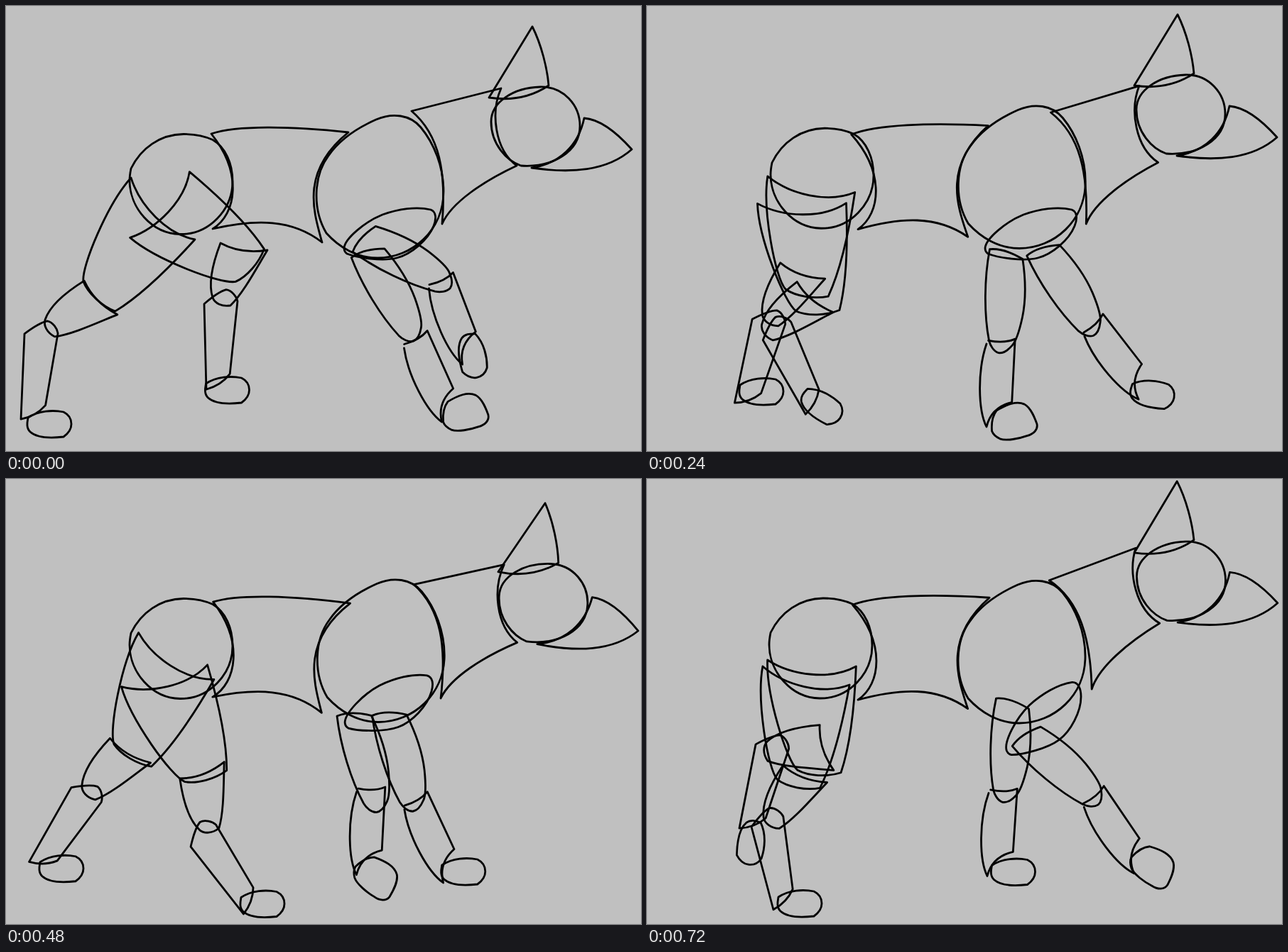
Write an HTML page that moves like this. It is 894 px wide and 627 px high and loops after 0.8 s.

```html
<!DOCTYPE html>
<html lang="en">
<head>
<meta charset="utf-8">
<title>Walk cycle</title>
<style>
  html, body { margin: 0; width: 100%; height: 100%; overflow: hidden; background: #c0c0c0; }
  svg { display: block; width: 894px; height: 627px; }
  path { fill: none; stroke: #000; stroke-width: 2.8; stroke-linejoin: round; stroke-linecap: round; }
</style>
</head>
<body>
<svg id="stage" viewBox="0 0 894 627"></svg>
<script>
const STEP = 80, COUNT = 10;
const KEYS = [0, 2, 4, 5, 7, 8, 9];
const HEAD_KEYS = [0, 2, 3, 4, 5, 6, 7, 8, 9];
const stage = document.getElementById('stage');
const parts = [];

// "x y [deg]" is a plain placement, "x y u v" a bone between two points.
function pose(text) {
  const [x, y, u = 0, v] = text.trim().split(' ').map(Number);
  if (v === undefined) return { x, y, a: u };
  return { x: (x + u) / 2, y: (y + v) / 2, a: Math.atan2(v - y, u - x) * 180 / Math.PI };
}

function mix(p, q, k) {
  const turn = ((q.a - p.a + 540) % 360 + 360) % 360 - 180;
  return { x: p.x + (q.x - p.x) * k, y: p.y + (q.y - p.y) * k, a: p.a + turn * k };
}

function poseAt(poses, keys, step) {
  let i = keys.length - 1;
  while (keys[i] > step) i--;
  const next = i + 1 < keys.length ? keys[i + 1] : COUNT;
  return mix(poses[i], poses[(i + 1) % poses.length], (step - keys[i]) / (next - keys[i]));
}

function part(shape, rest, track, keys = KEYS) {
  const el = document.createElementNS('http://www.w3.org/2000/svg', 'path');
  el.setAttribute('d', shape);
  stage.append(el);
  const r = pose(rest), poses = track.split(',').map(pose);
  const moves = Array.from({ length: COUNT }, (_, step) => {
    const p = poseAt(poses, keys, step);
    return `translate(${p.x} ${p.y}) rotate(${p.a - r.a}) translate(${-r.x} ${-r.y})`;
  });
  parts.push({ el, moves });
}

const limb = (shape, rest) => track => part(shape, rest, track);

const thigh = limb('M164 277C200 296 255 298 289 275C292 335 291 385 281 426C262 434 236 435 220 428C203 416 166 325 164 277Z', '164 277 289 275');
const shin = limb('M302 334C320 344 343 348 368 344C354 367 334 405 316 422C304 424 294 419 291 411C284 390 292 360 302 334Z', '302 334 368 344');
const hock = limb('M104 452C112 443 122 432 132 428C140 428 148 436 150 442L153 545C145 559 135 566 123 571Z', '104 452 123 571');
const upperArm = limb('M485 348C500 344 518 348 533 354C543 385 547 410 546 435C545 455 543 470 538 477C533 485 528 490 521 490C514 489 508 482 505 475C492 440 484 390 485 348Z', '509 351 522 490');
const foreArm = limb('M504 481C496 520 504 575 519 597C521 578 532 565 550 558L543 469C533 475 520 477 506 476', '504 481 519 597');
const flatPaw = limb('M-30 -9C-15 -19 5 -20 20 -17C28 -13 31 -6 31 0C31 6 27 13 20 18C3 20 -17 20 -27 11C-33 5 -31 -3 -30 -9Z', '0 0');
const roundPaw = limb('M-32 2C-29 -9 -24 -18 -16 -23C0 -26 15 -27 24 -18C31 -10 31 5 31 14C30 22 22 26 12 25C0 25 -18 22 -25 16C-30 11 -32 6 -32 2Z', '0 0');

// Trunk
part('M176 229C190 200 217 181 250 180.5C266 180.5 279 183 291 188.5C309 199 319 222 319 247C319 287 286 322 245 321.5C205 321 174 284 174 246C174 240 175 234 176 229Z',
  '0 0', '0 0, 0 -5.5, 0 -11, 0 -13, 0 -11, 0 -10.5, -2 -12.5');
part('M289 180C325 168 400 169 482 178C414 233 433 290 445 333C403 300 352 300 291 314C325 293 333 235 289 180Z',
  '289 180 445 333',
  '289 180 445 333, 287 181.5 452 326, 288 180 452 325, 293 173 441 334, 290 173 448 325, 289 172 452 320, 289 177 452 324');
part('M452 309C432 275 434 228 455 200C470 178 495 161 522 149C545 139 570 142 585 160C604 183 617 216 617 250C617 305 573 344 524 344C495 344 470 329 452 309Z',
  '0 0', '-1 11, 0 0, 0.5 -5, 0.5 0, 0 -3, 0 -4.5, 0 0');
part('M571 148L697 116C682 150 688 202 719 225C672 247 627 277 614 307C620 235 611 182 571 148Z',
  '571 148 719 225',
  '571 148 719 225, 569 150 718 220, 570 151 719 220, 575 150 719 231, 575 148 719 229, 569 147 719 214, 567 143 721 203');

// Head, ear and muzzle move as one
const headTrack = '741 29 881 202, 745 18 885 191, 747 12 887 185, 748 14 888 187, 749 25 889 198, 759 34 890 214, 767 43 881 234, 760 24 886 208, 746 3 888 175';
[
  'M725 225C705 218 683 195 683 163C683 135 715 115 752 114C785 113 808 140 808 169C808 205 770 228 725 225Z',
  'M741 29C754 55 762 88 764 112C740 128 712 134 680 129Z',
  'M814 158C840 160 864 183 881 202C846 233 795 236 740 228C780 222 806 196 814 158Z'
].forEach(shape => part(shape, '741 29 881 202', headTrack, HEAD_KEYS));

// Near foreleg
part('M476 341C477 328 505 304 530 294C552 286 578 282 598 287C606 290 606 300 602 310C594 330 570 350 550 355C530 360 495 355 480 349C477 347 476 344 476 341Z',
  '477 342 604 293',
  '477 342 604 293, 477 342 604 293, 477 342 604 293, 477 341 603 292, 481 347 594 273, 493 360 598 280, 509 382 605 291');
upperArm('510 349 574 471, 509 351 522 490, 502 351 470 485, 490 345 452 478, 494.5 340.5 588.6 442.8, 512.5 337 626 417, 534.5 363 635.7 458');
foreArm('560 481 614 587, 504 481 519 597, 452 472 437 588, 432 457 416 574, 555 423 571 543, 600 422 660 524, 615 462 686 556');
roundPaw('645 573.5 -20, 556 584.5 -20, 474 588 -20, 445 583.5 0, 596 538 61, 684 518 46, 711.5 545.5 27');

// Far foreleg
upperArm('504.5 328.5 625.7 396.5, 556 345.5 637.3 458.2, 560 344 620.7 469, 557 340.5 610.4 468.8, 523 327 536.6 465.3, 512.5 318 514 457, 514.5 317 501.5 455');
foreArm('595 397 643 506, 622 461 701 548, 610 470 683 560, 600 468 669 564, 522 464 562 573, 495 452 516 568, 481 442 479 560');
flatPaw('657 493 80, 717 546 20, 706 547, 691 549, 596.5 557, 552 557, 515.5 553.5');

// Near hind leg
thigh('176 242 266 329, 161 264 280 293, 155 293 276 262, 157 300 273 256, 169 285 293 268, 164 277 289 275, 163 264 285 290');
shin('110 387 157 435, 177 386 208 446, 249 394 313 414, 250 423 309 390, 239 421 306 407, 223 411 291 420, 190 403 255 428');
hock('26 462 21 582, 104 452 123 571, 226 496 320 573, 275 522 363 607, 245 514 306 619, 203 505 251 615, 147 490 178 607');
flatPaw('61 589, 151 562 47, 341 565 20, 384 593, 338 604, 285 602, 215 598');

// Far hind leg
thigh('175 326 258 234, 161 264 287 250, 183 217 294 274, 183 218 294 277, 190 215 292 288, 184 226 296 283, 170 255 294 264');
shin('302 334 368 344, 220 355 286 372, 154 368 217 397, 150 363 209 398, 142 367 199 402, 180 352 219 410, 243 346 263 411');
hock('279 419 282 541, 187 438 174 557, 109 446 73 560, 96 433 43 542, 88 436 22 537, 100 400 52 511, 153 374 130 492');
flatPaw('311.5 541, 208 542, 114 544, 93 545, 63 552.5, 81 543 80, 147 512.5 98');

let shown = -1;
function draw() {
  const step = Math.floor(performance.now() / STEP) % COUNT;
  if (step !== shown) {
    shown = step;
    for (const { el, moves } of parts) el.setAttribute('transform', moves[step]);
  }
  requestAnimationFrame(draw);
}
draw();
</script>
</body>
</html>
```
